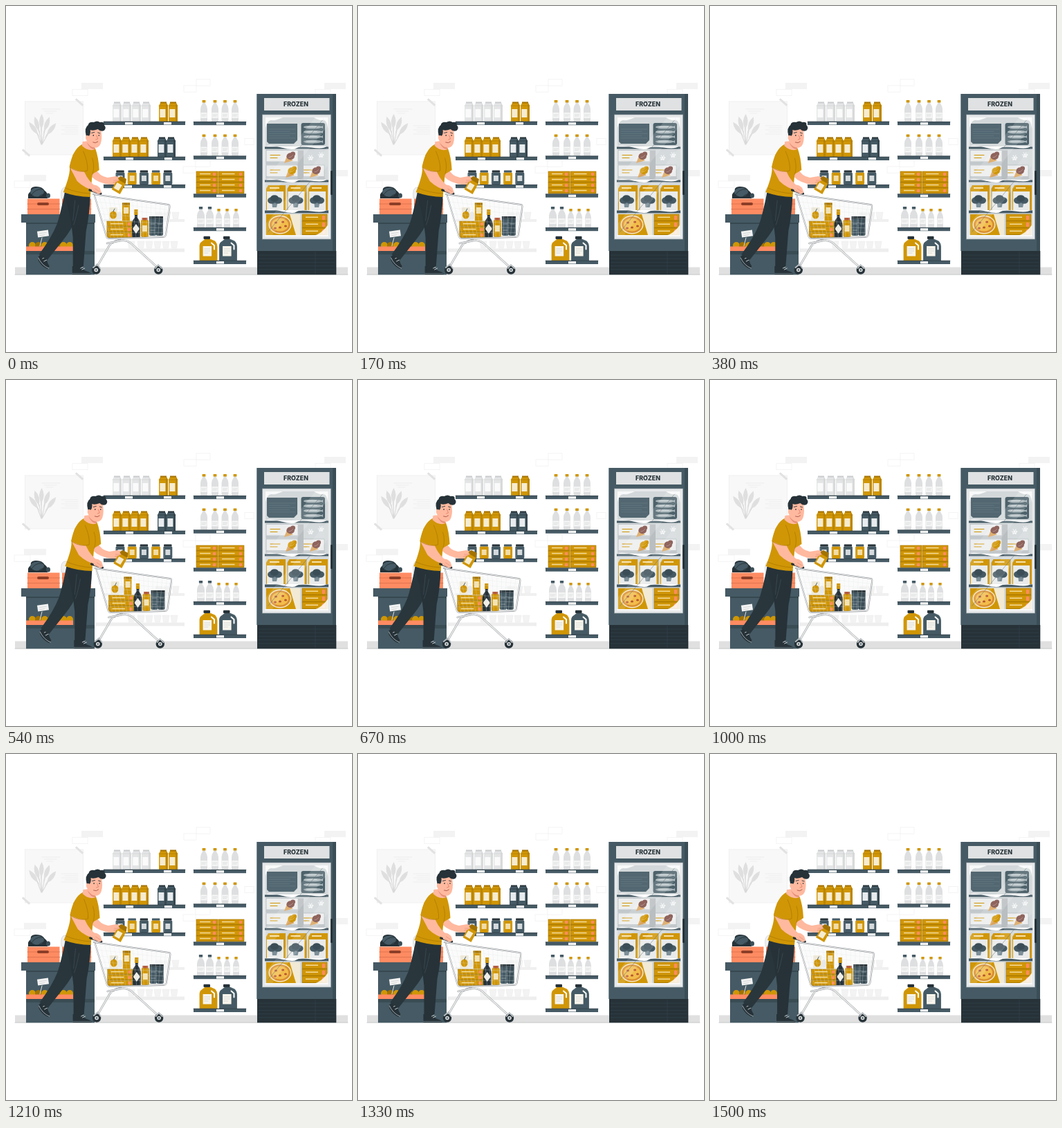
These frames come from a looping animation (500 by 500 pixels, 1.54 s). An HTML page:

```html
<!DOCTYPE html>
<html lang="en">
<head>
<meta charset="utf-8">
<title>Grocery aisle</title>
<style>
html, body { margin: 0; width: 100%; height: 100%; overflow: hidden; background: #fff; }
svg { display: block; width: 100vw; height: 100vh; }
text { font-family: Inter, "Open Sans", sans-serif; }
</style>
</head>
<body>
<svg id="stage" viewBox="0 0 500 500"></svg>
<script>
const SLATE = '#455a64', DARK = '#263238', GOLD = '#d09606', DEEP = '#a37300';
const GREY = '#e0e0e0', PALE = '#f3f3f3', MID = '#c4c8ca', ORANGE = '#ff8b62', SKIN = '#ffb99f';
const LOOP = 1540, BEAT = LOOP / 5;

const rect = (x, y, w, h, fill, more = '') =>
  `<rect x="${x}" y="${y}" width="${w}" height="${h}" fill="${fill}" ${more}/>`;
const path = (d, fill, more = '') => `<path d="${d}" fill="${fill}" ${more}/>`;
const line = (d, stroke, w = 0.6, more = '') =>
  `<path d="${d}" fill="none" stroke="${stroke}" stroke-width="${w}" stroke-linecap="round" stroke-linejoin="round" ${more}/>`;
const oval = (x, y, rx, ry, fill, more = '') =>
  `<ellipse cx="${x}" cy="${y}" rx="${rx}" ry="${ry}" fill="${fill}" ${more}/>`;
const at = (x, y, body, turn = 0, size = 1) =>
  `<g transform="translate(${x} ${y}) rotate(${turn}) scale(${size})">${body}</g>`;
const each = (list, fn) => list.map(fn).join('');
const range = (n, fn) => Array.from({ length: n }, (_, i) => fn(i)).join('');

function carton(x, base, fill, edge, label) {
  return at(x, base,
    path('M0 0V-23L2-27H11L13-23V0Z', fill) +
    path('M10 0V-23L11-27L13-23V0Z', edge, 'opacity=".45"') +
    rect(2, -28.5, 9, 2, edge) + line('M0-23H13', edge, .5) +
    rect(1.4, -18, 8, 12, label));
}

function jar(x, base, fill) {
  return at(x, base,
    rect(0, -17.5, 13, 17.5, fill, 'rx="1.6"') + rect(.8, -20.5, 11.4, 3, fill === GOLD ? SLATE : DARK, 'rx=".6"') +
    rect(3, -13, 7, 8, fill === GOLD ? '#f1dda6' : '#d5dadd') + line('M1.2-15V-2', '#fff', .4, 'opacity=".4"'));
}

function bottle(x, base, h, w, cap) {
  return at(x, base,
    path(`M0 0V${-h + 13}Q0 ${-h + 9} ${w * .3} ${-h + 5}V${-h + 2}H${w * .7}V${-h + 5}Q${w} ${-h + 9} ${w} ${-h + 13}V0Z`, '#dedfe0') +
    rect(w * .26, -h, w * .48, 3.4, cap, 'rx=".5"') +
    rect(.4, -13, w - .8, 8, '#f4f4f4') + line(`M1.8-10H${w - 1.8}M1.8-8H${w - 3}`, MID, .5));
}

function jug(x, base, fill) {
  return at(x, base,
    path('M0 0V-22Q0-26 4-28L8-31H15L22-28Q25-25 25-20V0Z', fill, `stroke="${fill}" stroke-width=".8"`) +
    rect(5.5, -35.3, 9.5, 4.2, DARK, 'rx="1"') +
    line('M17-25.5L21-22V-16.5', '#fff', 2) + rect(4.6, -21, 12.5, 14.5, '#f8f5ec') +
    line('M6.5-17H15M6.5-14H15M6.5-11H12', MID, .6));
}

function pack(x, y, w, h) {
  return rect(x, y, w, h, GOLD, `stroke="${DEEP}" stroke-width=".6"`) +
    rect(x, y + h - 1.6, w, 1.6, DEEP, 'opacity=".45"') +
    rect(x + 5, y + h * .35, w * .5, 1.5, '#f5dc9b') +
    rect(x + w - 7, y + 1.8, 4, h - 3.6, ORANGE, 'rx="1.2"');
}

function shelf(x, y, w, tags, h = 5.2) {
  return rect(x, y, w, h, SLATE) + line(`M${x} ${y + .4}H${x + w}`, DARK, .5) +
    each(tags, t => rect(t, y + 1.2, 11, 3.4, '#fff') + line(`M${t + 2.5} ${y + 2.9}h6`, MID, .6));
}

function wall() {
  const solid = [[109, 111, 31], [460, 111, 31], [26, 244, 32], [470, 237, 24]];
  const open = [[96, 120.5, 22], [447, 120.5, 22], [275, 106, 20], [257, 115, 18], [274, 223, 21],
    [256, 232, 18], [345, 191.5, 13], [12, 253, 23], [455, 246, 16]];
  const leaf = path('M0 8L-1 0Q-6-10 0-20Q6-10 1 0Z', '#dfdfdf');
  return each(solid, b => rect(b[0], b[1], b[2], 9.2, PALE)) +
    each(open, b => rect(b[0], b[1], b[2], 9.2, 'none', 'stroke="#efefef" stroke-width=".7"')) +
    rect(27.5, 138, 84, 77, '#f8f8f8', 'stroke="#ebebeb" stroke-width=".7"') +
    each([[-36, 45, 184], [-16, 47, 179], [2, 51, 176], [20, 56, 179], [38, 60, 185]], l => at(l[1], l[2], leaf, l[0])) +
    line('M45 184L51 200M48 180L51.5 200M51 177L52 200M56 180L52 200M60 186L52 200', '#d9d9d9', 1.1) +
    range(3, i => line(`M${52 + i * 3} ${149 + i * 3}H${78 - i * 5}`, '#e6e6e6', .6)) +
    range(5, i => line(`M${80 + i % 2 * 5} ${173 + i * 3}H104`, '#e8e8e8', .6)) +
    at(106, 139, rect(-7, -1.5, 14, 3, '#e2e2e2'), 42) + at(29, 212, rect(-7, -1.5, 14, 3, '#e2e2e2'), 42) +
    rect(13, 377.5, 481, 10.5, GREY) + line('M13 388.2H494', '#a9aeb1', .6);
}

function leftShelves() {
  const cup = (x, y) => path(`M${x} ${y}h10l-1.5 10h-7Z`, '#f3f3f3', 'stroke="#ebebeb" stroke-width=".5"');
  const dairy = [[154, 167], [168, 167], [182, 167], [196, 167]];
  return each(dairy, c => carton(c[0], c[1], '#e4e5e6', '#c9cccd', '#fafafa')) +
    each([221, 235], x => carton(x, 167, GOLD, DEEP, '#f6ecd0')) +
    shelf(141, 166.8, 118, [172, 228]) +
    each([154, 167, 180, 193], x => carton(x, 218, GOLD, DEEP, '#f6ecd0')) +
    each([219, 232], x => carton(x, 218, SLATE, DARK, '#e8ecee')) +
    shelf(141, 217.8, 118, [173, 229]) +
    range(5, i => jar(158.5 + i * 17.2, 258, i % 2 ? GOLD : SLATE)) +
    shelf(141, 258, 118, [171, 228]) +
    each([216, 228, 240], x => cup(x, 298) + cup(x - 2, 340)) + each([176, 190, 202], x => cup(x, 340)) +
    rect(141, 308, 117, 4, '#f0f0f0') + rect(130, 350.5, 128, 5, '#eee');
}

function midShelves() {
  const tall = [281, 297, 311.5, 326];
  return each([167, 216.5], y => each(tall, x => bottle(x, y, 31, 10, GOLD)) + shelf(271, y, 76, [304])) +
    range(4, i => pack(275, 239 + i * 8, 31, 8) + pack(307, 239 + i * 8, 37, 8)) +
    shelf(271, 271.5, 76, [304]) +
    each([276, 289], x => bottle(x, 320, 30, 11, SLATE)) +
    each([303, 315, 328], x => bottle(x, 320, 27, 9, GOLD)) + shelf(271, 320, 76, [304]) +
    jug(280, 368, GOLD) + jug(308.5, 368, SLATE) + shelf(271, 367.8, 76, [304]);
}

const cone = (x, y, scoop) => at(x, y,
  path('M-7 7L-3-3L4 4Z', '#dba45c') + oval(1, -1.5, 5, 4.3, scoop) + oval(4, -4.5, 3, 2.8, scoop) +
  line('M-1 0Q2 0 4-3', '#fff', .6, 'opacity=".4"'), 0, 1.15);

function fridge() {
  const frost = (x, y, w) => path(`M${x} ${y}h${w}q-4 4-${w * .25} 1.5t-${w * .25} 1t-${w * .25}-1t-${w * .25}-1.5Z`, '#fff');
  const broccoli = x => at(x, 282,
    path('M-2 0L-1 9H5L7 0Z', '#7d8f98') + oval(-2, -1, 6, 4.8, SLATE) + oval(7, -1, 6, 4.8, SLATE) + oval(2, -4, 6, 4.8, '#3b4e57'));
  const flake = (x, y) => range(3, i => at(x, y, line('M-4 0H4M2-1.5L4 0L2 1.5', '#fff', .7), i * 60));
  return rect(362.3, 127, 114.7, 227, SLATE) + rect(472, 127, 5, 227, '#3b4e57') +
    rect(373, 133, 94.5, 18, '#dfe1e2') +
    `<text x="419" y="145.4" font-size="8.8" font-weight="800" text-anchor="middle" fill="${DARK}">FROZEN</text>` +
    line('M414.5 138L416 139.3L417.5 138', DARK, .8) +
    rect(370.5, 157, 99, 180, '#e6e8e9', 'stroke="#8d999f" stroke-width=".7"') +
    rect(375, 161, 90.5, 171, '#d3d8da') +
    path('M377 170H421V194L416 199H380L377 196Z', '#526771') +
    range(5, i => line(`M380 ${178 + i * 3.2}H${418 - i % 2 * 8}`, '#6c8089', .5)) +
    rect(426.5, 169, 34.5, 32, '#4d626b', 'rx="3"') +
    range(4, i => oval(443, 175 + i * 7, 13, 2.3, '#a9b5ba') + path(`M454 ${175 + i * 7}l4-2v4Z`, '#a9b5ba') +
      line(`M435 ${174.5 + i * 7}H449`, '#dfe4e6', .6)) +
    rect(374, 203.5, 92, 3, SLATE) + frost(376, 203, 87) +
    each([[376, 208.5, 46], [376, 230, 46], [422, 230, 38]], b =>
      rect(b[0], b[1], b[2], 20, '#eceded', 'stroke="#aab3b7" stroke-width=".6"') +
      rect(b[0], b[1] + 16, b[2], 4, '#c2c8cb') + line(`M${b[0] + 6} ${b[1] + 7}h14m-14 4h10`, GOLD, 1)) +
    rect(422, 208.5, 38, 20, '#d5dadc') + rect(422, 208.5, 8, 42, '#b9bec1') +
    cone(410, 219, '#7d4a42') + cone(412, 240, GOLD) + cone(447, 240, '#7d4a42') +
    flake(440, 219) + flake(455, 215) +
    rect(374, 251.5, 92, 3, SLATE) + frost(376, 251, 87) +
    each([376, 406.5, 437], x => path(`M${x} 295V264L${x + 3} 259H${x + 28}V295Z`, GOLD) +
      rect(x + 1, 268, 24, 27, '#e9ebeb') + rect(x + 5, 262, 14, 2, '#f8e2a8') + broccoli(x + 10)) +
    rect(374, 295.5, 92, 3.8, SLATE) + frost(376, 295, 87) +
    rect(376, 301, 49, 30, GOLD) + path('M410 301H425V331H419Z', '#f2ead5') +
    oval(396, 316, 16.5, 13.5, '#f4e7c3') + oval(396, 316, 15, 12, '#d98f32') + oval(396, 316, 12, 9.4, '#f2bd4b') +
    each([[390, 313], [400, 312], [396, 320], [404, 318], [389, 321]], p => oval(p[0], p[1], 2, 1.6, '#b7532f')) +
    range(3, i => pack(428, 301 + i * 10, 36, 10)) +
    rect(374, 331, 92, 2.5, '#f4f5f5') +
    path('M375 250L447 161H465.5V173L375 285Z', '#fff', 'opacity=".14"') +
    path('M375 315L465.5 203V230L384 332H375Z', '#fff', 'opacity=".14"') +
    line('M379 326L440 253M424 205L459 163', '#607079', .5) +
    path('M375 161H400Q390 166 384 165T375 176ZM465.5 161H445Q452 166 458 165T465.5 178ZM465.5 332H445Q456 329 465.5 316Z', '#fff', 'opacity=".85"') +
    rect(469, 238, 3, 35, DARK, 'rx="1"') +
    rect(363, 354, 114.3, 34.3, DARK) + range(5, i => line(`M365 ${360 + i * 5.2}H475`, '#34454d', .6)) +
    line('M447 355V387', '#34454d', .6);
}

function counter() {
  const crate = (x, w) => rect(x, 278.5, w, 22.5, ORANGE) +
    line(`M${x} 286H${x + w}M${x} 293.5H${x + w}`, '#d06a47', .7);
  return path('M32 278Q31 270 36 268Q34 262 42 261Q52 260 56 267Q61 270 60 278Z', DARK) +
    oval(45, 269, 10, 6.5, SLATE) + line('M37 273Q42 264 52 265M48 275Q54 270 57 273', DARK, .8) +
    oval(61, 274, 3, 3.5, '#3b4e57') +
    crate(31, 46.5) + rect(45, 284, 17, 4, '#8c3e27', 'rx="2"') + crate(81, 42) +
    path('M80 278Q78 263 85 262H92V278Z', '#efefef', 'stroke="#ccc" stroke-width=".6"') +
    rect(29, 312, 99, 76.3, SLATE) + rect(22, 301, 107, 12, SLATE) + rect(29, 313, 99, 2, DARK, 'opacity=".45"') +
    range(7, i => oval(38 + i * 9, 346, 5, 5, i % 3 === 1 ? DEEP : GOLD)) +
    line('M52 335L49 347', GREY, 1) + at(53.5, 329, rect(-8, -4.5, 16, 9, '#f2f2f2') + line('M-5-1H5M-5 2H2', MID), -8) +
    rect(29, 347.5, 68, 6.5, ORANGE) + rect(29, 354, 99, 5, DARK, 'opacity=".35"');
}

function head() {
  return path('M110 196L126 194L128 207Q119 211 109 202Z', SKIN) + path('M116 197Q123 205 127 204L128 207Q120 207 116 197Z', '#e78f78') +
    path('M115 180Q123 172 136 177Q139 190 136 199Q132 208 122 203Q113 197 115 180Z', SKIN) +
    path('M115 187Q112 176 118 172Q119 167 126 168Q131 165 135 168Q142 167 141 172Q145 176 141 180Q136 182 132 178Q125 181 121 179Q122 186 118 189Z', DARK) +
    oval(117, 190.5, 2.6, 3.4, SKIN) +
    oval(125.5, 187, .8, 1.1, DARK) + oval(133.5, 187, .7, 1, DARK) +
    line('M123 183.5L127 182.5M132 183L135 184', DARK, .9) +
    line('M130 187L132 192L129 193', '#d8735e', .7) + line('M125 197Q129 199 132 196', '#9b4638', .8);
}

function man() {
  const frontShoe = path('M0 0L12-1Q15 6 23 8Q27 9 27 12H0Z', DARK) + line('M0 10.5H26', '#78898f', .7) +
    line('M12 3L16 1M14 5L18 3', '#eee', .8);
  const backShoe = path('M-7 6L1 0L7 5Q3 11 9 20L7 24Q-1 22-7 12Z', DARK) +
    line('M-7 8Q-2 19 8 23', '#d5dadd', .7) + line('M-1 9L3 7M1 13L5 11', '#eee', .8);
  return at(53, 356, backShoe) + at(95, 376, frontShoe) +
    path('M84 270L111 274Q104 311 82 338L59 367L47 359Q65 335 73 315Q78 300 84 270Z', '#29363c') +
    path('M84 270L121 274Q120 302 115 325L111 377L96 376L96 335Q93 305 87 285Z', DARK) +
    line('M104 288Q101 305 97 316M99 281L96 310', '#4a5a62', .5) +
    path('M129 235Q134 246 146 248L158 246Q164 247 166 251L160 258L149 258Q132 256 122 246Z', SKIN) +
    path('M109 200Q118 208 128 205Q133 218 134 237L124 243L121 276Q101 276 82 269Q93 242 91 232Q96 207 109 200Z', GOLD) +
    path('M92 234Q105 229 112 239Q119 255 132 263L131 268Q113 264 102 253Z', SKIN) +
    path('M96 215Q103 204 111 210Q117 224 117 238Q109 242 91 233Z', GOLD) +
    line('M111 210Q118 226 117 238Q106 242 92 234M124 220Q128 232 124 244M85 263Q101 270 121 271', DEEP, .6) +
    head();
}

function cart() {
  const steel = '#b9bec1', edge = '#858b8f';
  const rail = (d, w) => line(d, edge, w + .8) + line(d, '#ececec', w);
  const wheel = x => oval(x, 381.5, 6.2, 6.2, DARK) + oval(x, 381.5, 2.8, 2.8, GREY) + oval(x, 381.5, 1.2, 1.2, SLATE);
  const goods =
    range(3, i => pack(146, 311 + i * 8, 37, 8)) +
    rect(149, 291, 12, 19, '#f0ead8') + oval(155, 302, 5, 5.5, GOLD) + line('M155 297L157 293', SLATE, 1) +
    rect(168, 284.5, 11, 26, GOLD) + rect(170, 291, 7, 9, '#f4e3b3') + rect(168, 284.5, 11, 3, DEEP) +
    oval(164, 303, 4, 6, '#e9e9e9') +
    path('M182 335V317Q182 310 186 306V295H190V306Q194 311 194 317V335Z', DARK) + rect(185.4, 294, 5.2, 8, GOLD) +
    path('M188 315L193 322L188 329L183 322Z', '#f0eee6') +
    rect(195, 309, 11, 25, GOLD, 'rx="2"') + rect(196.5, 306, 8, 3.5, '#b45a3c') + rect(197, 317, 7, 9, '#f4e3b3') +
    rect(207, 306, 10, 26, SLATE, 'rx="2"') + rect(217, 306, 10, 26, '#3b4e57', 'rx="2"') +
    rect(207, 304, 20, 3.5, DARK) + line('M209 315H215M219 315H225M209 324H215', '#9aa8ae', .8);
  const mesh = range(15, i => {
    const k = (i + 1) / 16;
    return line(`M${128 + 109 * k} ${274 + 14 * k}L${146 + 84 * k} ${336 - 2 * k}`, '#dfe2e4', .4);
  }) + range(6, i => {
    const k = (i + 1) / 7;
    return line(`M${128 + 18 * k} ${274 + 62 * k}L${237 - 7 * k} ${288 + 46 * k}`, '#dfe2e4', .4);
  });
  return path('M128 274L237 288L230 334L146 336Z', '#f7f7f7', 'opacity=".5"') + goods + `<g opacity=".7">${mesh}</g>` +
    rail('M165 338Q151 340 146 352L132 376', 1.7) +
    rail('M146 343L166 339Q176 337 184 346L218 377', 1.7) +
    wheel(130.3) + wheel(220.3) +
    line('M126 378L132 373L136 379M216 379L220 374L225 379', steel, 1.8) +
    rail('M126 272L235 287Q237 288 236.5 291L231 331Q230 334 227 334L149 336Q146 336 145 333L128 274', 1.2) +
    line('M121 266L137 271', DARK, 3.2);
}

function held() {
  return path('M152 265L160 250L165 246L173 250L172 257L164 272Z', GOLD) +
    path('M160 250L165 246L173 250L172 257Z', DEEP) +
    path('M155 263L160 255L167 259L162 267Z', '#f6ecd0') +
    path('M149 250Q155 246 161 249L163 252L157 255L150 257Z', SKIN) + line('M155 252L162 252M154 255L159 254', '#d98a74', .6) +
    path('M121 260Q128 256 135 263L137 269Q134 274 130 270L124 268Z', SKIN) + line('M128 264L134 268M126 267L130 270', '#d98a74', .6);
}

const stage = document.getElementById('stage');
stage.innerHTML = wall() + leftShelves() + midShelves() + fridge() + counter() +
  `<g id="shopper">${at(0.8, 0, man())}${cart()}${at(0.8, 0, held())}</g>`;
const shopper = document.getElementById('shopper');

// Five sideways rattles that settle toward the end of the loop.
function draw(ms) {
  const t = ms % LOOP;
  const reach = 2.5 * (1 - Math.pow(t / LOOP, 6));
  const x = -reach * Math.sin(2 * Math.PI * t / BEAT);
  shopper.setAttribute('transform', `translate(${x.toFixed(3)} 0)`);
}

const start = performance.now();
function tick() {
  draw(performance.now() - start);
  requestAnimationFrame(tick);
}
draw(0);
requestAnimationFrame(tick);
</script>
</body>
</html>
```
